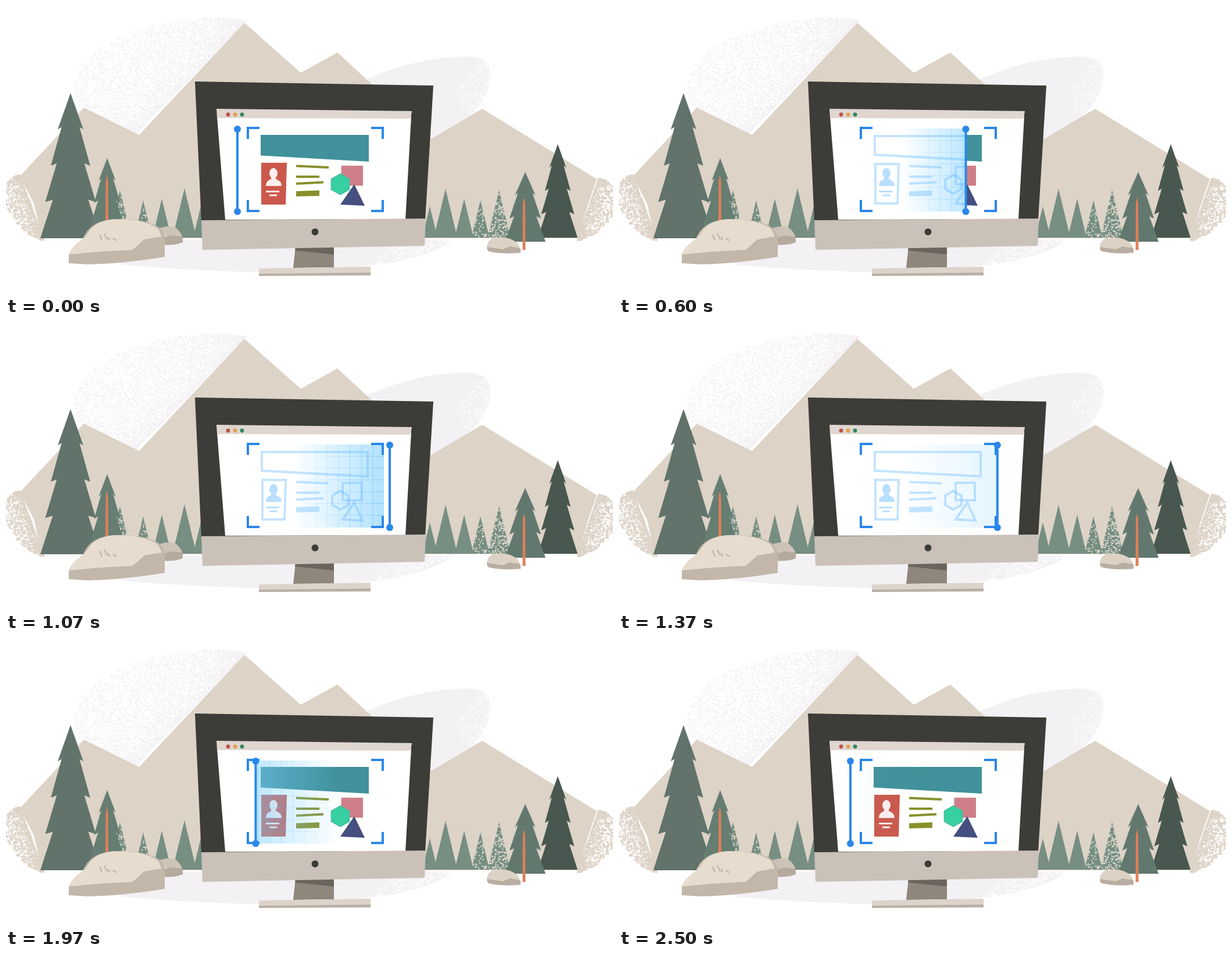
Animation of 1044x496 px, one loop 2.53 s. Source, as an HTML page with a canvas:

```html
<!DOCTYPE html>
<html lang="en">
<head>
<meta charset="utf-8">
<title>Design scan</title>
<style>
html, body { margin: 0; width: 100%; height: 100%; overflow: hidden; background: #fff; }
canvas { display: block; }
</style>
</head>
<body>
<canvas id="stage" width="1044" height="496"></canvas>
<script>
const W = 1044, H = 496, LOOP = 2530;
const BLUE = '#2a87ea', TAN = '#ddd3c7', PINE = '#768f82', MIST = '#f3f1f4';
const WIRE = 'rgba(100,185,255,.38)';
const stage = document.getElementById('stage').getContext('2d');
const scene = document.createElement('canvas');
scene.width = W;
scene.height = H;
let g = scene.getContext('2d');

let seed = 7;
const rand = () => (seed = seed * 16807 % 2147483647) / 2147483647;

const fill = (color, d) => { g.fillStyle = color; g.fill(new Path2D(d)); };
const poly = (color, pts) => fill(color, `M${pts}z`);
const line = (color, width, d) => {
  g.strokeStyle = color;
  g.lineWidth = width;
  g.stroke(new Path2D(d));
};
const dot = (color, x, y, r) => {
  g.fillStyle = color;
  g.beginPath();
  g.arc(x, y, r, 0, 7);
  g.fill();
};
const clipped = (d, draw) => {
  g.save();
  g.clip(new Path2D(d));
  draw();
  g.restore();
};
const box = (x0, y0, x1, y1) => `M${x0} ${y0}H${x1}V${y1}H${x0}z`;

// Specks that start on the segment a-b and thin out along (dx, dy), in a rounded cloud
function spray(color, n, size, ax, ay, bx, by, dx, dy) {
  g.fillStyle = color;
  for (let i = 0; i < n; i++) {
    const u = rand(), s = size * (.5 + rand());
    const v = rand() ** 1.7 * Math.sqrt(Math.sin(Math.PI * u));
    g.fillRect(ax + (bx - ax) * u + dx * v, ay + (by - ay) * u + dy * v, s, s);
  }
}

// Small plain tree, eaten away by n specks
function backTree(x, top, n = 0) {
  const half = (400 - top) / 4.2, d = `M${x} ${top}L${x + half} 399H${x - half}z`;
  fill(PINE, d);
  clipped(d, () => {
    g.fillStyle = '#e2dad0';
    for (let i = 0; i < n; i++)
      g.fillRect(x + (rand() * 2 - 1) * half, top + rand() * (400 - top), 2.2, 2.2);
  });
}

// Tiers widen downwards, with a notch under each
function conifer(color, x, top, half, base, tiers) {
  const side = dir => {
    const pts = [];
    for (let k = 1; k <= tiers; k++) {
      const w = dir * half * (k / tiers) ** .62, y = top + (base - top) * k / tiers;
      pts.push(`${x + w} ${y}`);
      if (k < tiers) pts.push(`${x + w * .7} ${y - 4}`);
    }
    return pts;
  };
  poly(color, [`${x} ${top}`, ...side(1), ...side(-1).reverse()].join(' '));
}
const trunk = (x, top, base) =>
  poly('#de7f5a', `${x} ${top} ${x + 2} ${top + 9} ${x + 2.5} ${base} ${x - 2.5} ${base} ${x - 2} ${top + 9}`);

function drawLand() {
  g.fillStyle = '#fff';
  g.fillRect(0, 0, W, H);

  spray(MIST, 6500, 1.7, 412, 25, 205, 235, -170, -40);
  fill(MIST, 'M600 135Q700 88 790 87Q836 88 833 120Q832 165 780 205L730 235z');
  spray('#fff', 350, 1.6, 838, 90, 815, 190, -50, 5);
  fill(MIST, 'M265 402H768Q745 425 665 442Q560 457 430 458Q300 455 195 445z');
  spray('#fff', 500, 1.6, 775, 398, 640, 455, -30, -28);

  poly(TAN, '62 400 48 340 24 293 134 175 229 222 410 29 507 115 570 80 731 229 819 177 1016 298 1000 345 985 400');
  spray(TAN, 1100, 2.2, 64, 402, 22, 290, -42, 0);
  spray(TAN, 1100, 2.2, 982, 402, 1018, 296, 46, 0);

  for (const [x, top] of [[268, 332], [307, 314], [335, 345], [729, 345], [756, 315], [788, 332]])
    backTree(x, top);
  backTree(196, 317, 190);
  backTree(236, 335, 40);
  backTree(816, 335, 80);
  backTree(848, 317, 250);

  conifer('#61736a', 111, 150, 52, 400, 4);
  conifer('#667d72', 174, 262, 29, 378, 3);
  trunk(173.5, 291, 372);
  conifer('#48574f', 949, 238, 34, 399, 4);
  conifer('#62786e', 893, 286, 35, 406, 3);
  trunk(891, 330, 420);

  fill('#b5aa9d', 'M255 386Q273 377 290 381Q301 387 304 400V407Q290 413 264 411z');
  fill('#cdc3b7', 'M262 385Q278 376 292 382Q300 388 303 397L283 395L274 399z');
  fill('#c2b7a9', 'M108 428Q113 414 132 402Q142 372 180 368Q225 364 258 378Q274 388 273 405V432Q200 444 140 445L108 443z');
  fill('#e6ddcf', 'M108 428C116 408 136 402 142 389Q156 368 190 367Q240 367 262 384L268 397L238 402L218 420Q165 422 108 428z');
  line('#c2b7a9', 2.5, 'M161 394L165 404M169 392L174 402M176 398L178 404M184 400L190 404');
  fill('#b9aea1', 'M827 417Q828 402 842 399Q867 396 880 409L885 419V425Q850 428 829 422z');
  fill('#ddd3c5', 'M827 415Q831 401 842 399Q867 396 881 410L884 417L866 414L855 419z');
}

function drawMonitor() {
  poly('#8f867c', '498 414 564 414 564 450 494 451');
  poly('#6b645d', '498 414 564 414 564 428 497 421');
  poly('#b9afa5', '435 454 627 451 627 464 435 465');
  poly('#dcd4cb', '435 452 627 449 627 459 435 461');
  poly('#3c3c38', '325 130 735 137 721 368 336 371');
  poly('#fff', '363 190 697 190 687 367 377 368');
  poly('#dfd6d0', '362 177 698 181 696 194 363 193');
  ['#c0504d', '#e0a050', '#2c8a5a'].forEach((color, i) => dot(color, 382 + 12 * i, 187, 3.4));
  poly('#cac1b9', '336 369 722 366 720 413 338 420');
  dot('#3c3c38', 531.5, 389, 6);
}

function person(color) {
  fill(color, 'M453 288A7 9 0 1 1 467 288A7 9 0 1 1 453 288zM456 292H464V298Q474 301 474 310H447Q447 301 456 298z');
  line(color, 3, 'M447 319.5H470M453 326H466');
}
function textLines(color) {
  line(color, 4, 'M499 275.5L555 278M499 294H539M499 306L546 303.5');
  poly(color, '499 319 539 317.5 539 327 499 328');
}
function hexagon(r) {
  const pts = [];
  for (let a = 0; a < 6; a++)
    pts.push(`${575 + r * Math.sin(a * Math.PI / 3)} ${307 - r * Math.cos(a * Math.PI / 3)}`);
  return `M${pts.join(' ')}z`;
}
function drawColors() {
  poly('#40919b', '438 222 624 222 624 268 438 257.5');
  poly('#cb584c', '439 270 483 270 481 342 439 342');
  person('#fbeeed');
  textLines('#87902a');
  fill('#d07f88', box(576.5, 275, 614, 309.5));
  fill('#36d0a2', hexagon(18));
  line('#45bb98', 1.5, hexagon(18));
  poly('#454f80', '599 307 617 344 575 342');
}
function drawWires() {
  const shapes = ['M440 224H622V266L440 256z', 'M441 272H481L479 340H441z',
    box(579, 277, 612, 307), hexagon(16), 'M599 311L613 342L579 340z'];
  for (const d of shapes) line(WIRE, 4, d);
  person('rgba(100,185,255,.45)');
  textLines(WIRE);
}

// Light and grid left behind by the bar; a negative width trails to the left
function drawTrail(x, width, alpha) {
  if (alpha <= 0) return;
  const fade = (rgb, a) => {
    const grad = g.createLinearGradient(x, 0, x + width, 0);
    grad.addColorStop(0, `rgba(${rgb},${a})`);
    grad.addColorStop(1, `rgba(${rgb},0)`);
    return grad;
  };
  const [x0, x1] = [x, x + width].sort((a, b) => a - b);
  clipped(box(Math.max(x0, 414), 211, Math.min(x1, 650), 354), () => {
    g.globalAlpha = alpha;
    g.fillStyle = fade('125,207,255', .75);
    g.fillRect(414, 211, 236, 143);
    let d = '';
    for (let i = 1; i < 12; i++) d += `M${414.3 + 19.7 * i} 211V354`;
    for (let i = 1; i < 7; i++) d += `M414 ${211 + 20.3 * i}H650`;
    line(fade('90,185,245', .6 * Math.sqrt(alpha)), 1.3, d);
  });
}

// Smoothstep over a curve that lingers at both ends, solved by bisection
function ease(p) {
  if (p <= 0) return 0;
  if (p >= 1) return 1;
  let lo = 0, hi = 1;
  for (let i = 0; i < 20; i++) {
    const s = (lo + hi) / 2;
    if (1.26 * s * (1 - s) + s ** 3 < p) lo = s; else hi = s;
  }
  return lo * lo * (3 - 2 * lo);
}
const ramp = (t, from, to) => Math.min(1, Math.max(0, (t - from) / (to - from)));

function frame(now) {
  const t = now % LOOP;
  const x = 398 + 262 * (ease((t - 77) / 891) - ease((t - 1237) / 1056));
  g = stage;
  g.drawImage(scene, 0, 0);
  clipped(box(x, 195, 700, 366), drawColors);
  drawTrail(x, -20 - 145 * ramp(t, 230, 830), ramp(t, 230, 790) * ramp(t, 1510, 1000));
  drawTrail(x, 20 + 130 * ramp(t, 1400, 2000), .65 * ramp(t, 1400, 1900) * ramp(t, 2530, 2100));
  clipped(box(370, 195, x, 366), drawWires);
  line(BLUE, 4, 'M416 229V210H436M628 210H648V229M416 334V353H436M628 353H648V334');
  line(BLUE, 4, `M${x} 212V354`);
  dot(BLUE, x, 212, 6);
  dot(BLUE, x, 354, 6);
  requestAnimationFrame(frame);
}

drawLand();
drawMonitor();
requestAnimationFrame(frame);
</script>
</body>
</html>
```
